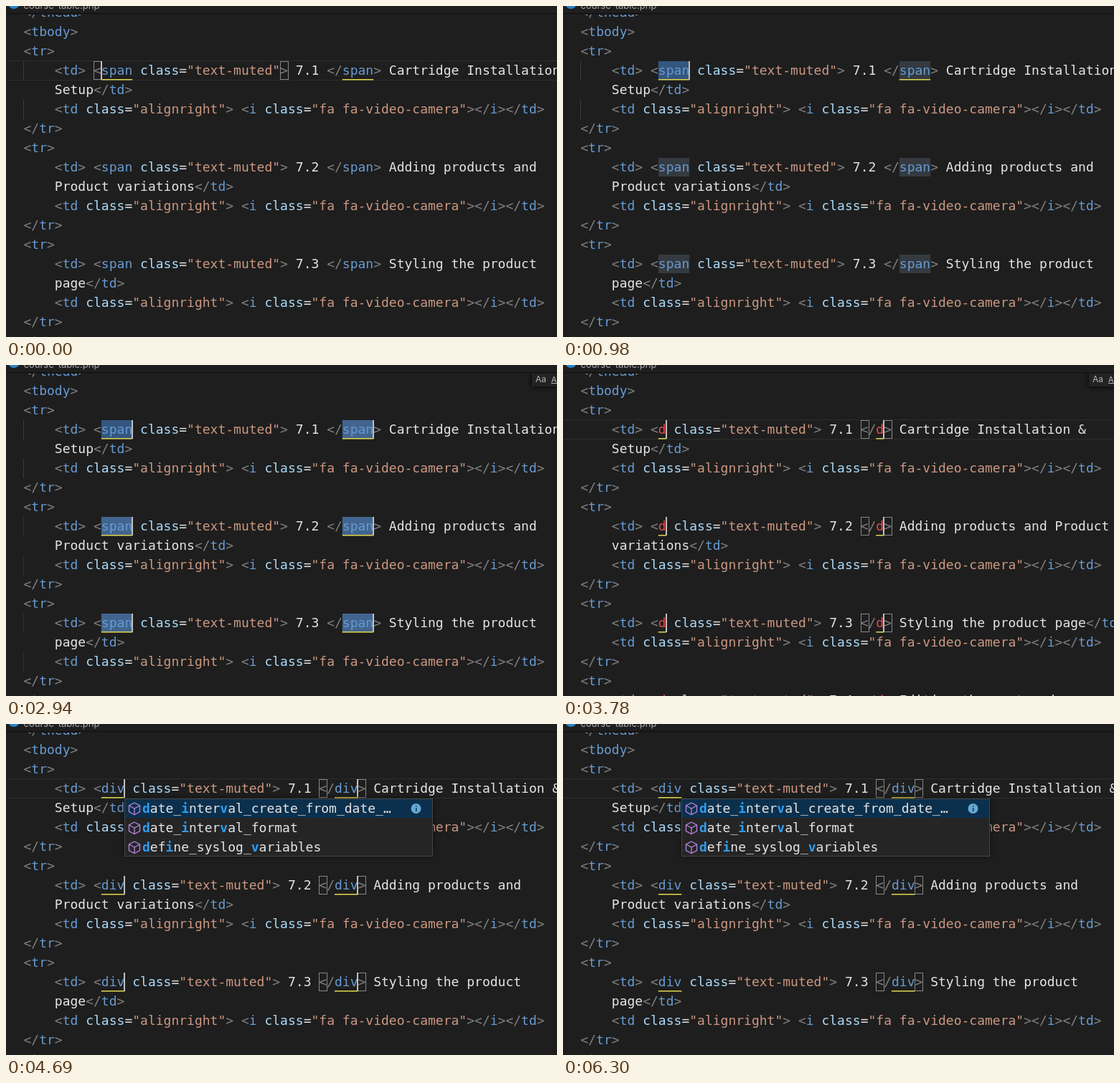
An HTML page with a canvas that plays this animation: 768 by 462 pixels, repeating every 6370 ms.

```html
<!DOCTYPE html>
<html lang="en">
<head>
<meta charset="utf-8">
<title>Multi-cursor editing</title>
<style>
html, body { margin: 0; width: 100%; height: 100%; overflow: hidden; background: #1e1e1e; }
canvas { display: block; width: 768px; height: 462px; }
</style>
</head>
<body>
<canvas id="stage" width="768" height="462"></canvas>
<script>
const ctx = document.getElementById('stage').getContext('2d');
const LOOP = 6370, LINE = 27, LEFT = 24.5, WRAP = 68;
const MONO = '18px "DejaVu Sans Mono", monospace';
const SANS = 'Inter, "Liberation Sans", sans-serif';
const color = {
  bg: '#1e1e1e', mark: '#808080', tag: '#679ad1', bad: '#e5484d', attr: '#aadafa',
  string: '#cb9781', text: '#e4e4e4', match: '#2f9cf0', line: '#e3d94f'
};
ctx.font = MONO;
const CHAR = ctx.measureText('m').width;
const INDENT = LEFT + 4 * CHAR;

const titles = [
  'Cartridge Installation & Setup',
  'Adding products and Product variations',
  'Styling the product page',
  'Editing the cart and checkout'
];
const selectTimes = [630, 1610, 2170, 2310, 2450, 2590];
const typing = [[3700, 'd'], [3990, 'di'], [4480, 'div']];
const diList = ['die', 'die', 'dir', 'dirname', 'disk_free_space', 'disk_total_space',
  'diskfreespace', 'dba_insert', 'date_interval_create_from_date_stri…',
  'date_interval_format', 'date_isodate_set', 'datefmt_is_lenient'];
const divList = ['date_interval_create_from_date_…', 'date_interval_format',
  'define_syslog_variables'];

function rect(x, y, w, h, fill) {
  ctx.fillStyle = fill;
  ctx.fillRect(x, y, w, h);
}

function outline(x, y, w, h, stroke) {
  ctx.strokeStyle = stroke;
  ctx.lineWidth = 1;
  ctx.strokeRect(Math.round(x) + .5, y + .5, Math.round(w), h);
}

function write(text, x, y, fill, font = MONO) {
  ctx.font = font;
  ctx.fillStyle = fill;
  ctx.fillText(text, x, y);
}

function disc(x, y, r, fill) {
  ctx.fillStyle = fill;
  ctx.beginPath();
  ctx.arc(x, y, r, 0, 7);
  ctx.fill();
}

function path(points, close) {
  ctx.beginPath();
  points.forEach(([x, y]) => ctx.lineTo(x, y));
  if (close) ctx.closePath();
  ctx.stroke();
}

function writeCode(line, x, y) {
  let col = 0;
  const put = (text, fill) => {
    write(text, x + col * CHAR, y, fill);
    col += text.length;
  };
  const syntax = /(<\/?)([a-z]+)|([a-z]+)(=)("[^"]*")|(>)|(\s+|[^<>\s]+)/g;
  for (const [, open, tag, attr, equals, value, end, text] of line.matchAll(syntax)) {
    if (tag) {
      put(open, color.mark);
      put(tag, /^di?$/.test(tag) ? color.bad : color.tag);
    } else if (attr) {
      put(attr, color.attr);
      put(equals, color.text);
      put(value, color.string);
    } else if (end) put(end, color.mark);
    else put(text, color.text);
  }
}

function wrapLesson(index, word) {
  const lines = [`<td> <${word} class="text-muted"> 7.${index + 1} </${word}> `];
  const parts = titles[index].split(' ');
  parts.forEach((part, i) => {
    const piece = part + (i === parts.length - 1 ? '</td>' : ' ');
    const last = lines.length - 1;
    if (lines[last].length + piece.length > WRAP) lines.push(piece);
    else lines[last] += piece;
  });
  return lines;
}

function layout(word) {
  const lines = [['</thead>', 0], ['<tbody>', 0]];
  const lessons = [];
  titles.forEach((_, i) => {
    lines.push(['<tr>', 0]);
    lessons.push(lines.length);
    wrapLesson(i, word).forEach(text => lines.push([text, 1]));
    lines.push(['<td class="alignright"> <i class="fa fa-video-camera"></i></td>', 1]);
    lines.push(['</tr>', 0]);
  });
  return { lines, lessons };
}

const rowTop = row => row * LINE - 4;
const column = n => INDENT + n * CHAR;

function drawGuides(lines, t) {
  let block = -1;
  lines.forEach(([text, indent], row) => {
    if (text === '<tr>') block++;
    if (!indent || block > 0 && t < selectTimes[1]) return;
    if (text.startsWith('<td')) rect(24, rowTop(row), 1, LINE, block ? '#303030' : '#3b3b3b');
  });
}

// Selections and highlights sit under the code; carets and outlines sit above it.
function drawSelections(lessons, selected) {
  if (!selected) return;
  lessons.slice(0, 3).forEach((row, i) => [6, 37].forEach((col, side) => {
    const order = i * 2 + side;
    const fill = order >= selected ? '#343a40' : order ? '#42658f' : '#34577f';
    rect(column(col), rowTop(row), 4 * CHAR, LINE - 1, fill);
  }));
}

function drawMarks(lessons, word, selected, typed, caretOn) {
  const n = word.length, closing = 33 + n;
  lessons.slice(0, 3).forEach((row, i) => {
    const y = rowTop(row);
    const bracket = col => outline(column(col), y, CHAR, 25, '#888888');
    const caret = col => caretOn && rect(Math.round(column(col)) - 1, y, 2, 26, '#c0c0bc');
    if (typed || i === 0 || selected > 2 * i)
      [6, closing].forEach(col => rect(column(col), y + 25, n * CHAR, 1.5, color.line));
    if (typed) {
      bracket(31 + n);
      bracket(closing + n);
      caret(6 + n);
      caret(closing + n);
    } else if (selected) {
      [6, 37].forEach((col, side) => {
        if (i * 2 + side < selected) caret(col + 4);
      });
    } else if (i === 0) {
      bracket(5);
      bracket(29);
      caret(6);
    }
  });
}

function drawCube(x, y) {
  ctx.strokeStyle = '#b180d7';
  ctx.lineWidth = 1.4;
  path([[x, y - 8], [x + 7.5, y - 4], [x + 7.5, y + 4.5], [x, y + 8.5],
    [x - 7.5, y + 4.5], [x - 7.5, y - 4]], true);
  path([[x - 7.5, y - 4], [x, y], [x + 7.5, y - 4]]);
  path([[x, y], [x, y + 8.5]]);
}

function drawKeyword(x, y) {
  ctx.strokeStyle = '#c5c5c5';
  ctx.lineWidth = 1.4;
  for (let i = 0; i < 4; i++) {
    const ly = y - 7 + i * 4.7, gap = i % 2 ? 3 : -2;
    path([[x - 9, ly], [x + gap - 2, ly]]);
    path([[x + gap + 1, ly], [x + 8, ly]]);
  }
}

function drawPopup(x, word, list) {
  const height = list.length * LINE - 1, y = 104;
  ctx.save();
  ctx.shadowColor = 'rgba(0,0,0,.5)';
  ctx.shadowBlur = 8;
  rect(x, y, 430, height, '#252526');
  ctx.restore();
  rect(x + 1, y + 1, 428, LINE - 1, '#0b304d');
  list.forEach((name, i) => {
    const mid = y + 14 + i * LINE;
    (list.length > 3 && i === 1 ? drawKeyword : drawCube)(x + 14, mid);
    let found = 0;
    [...name].forEach((char, k) => {
      const hit = char === word[found];
      if (hit) found++;
      write(char, x + 25 + k * CHAR, mid + 6, hit ? color.match : color.text,
        hit ? 'bold ' + MONO : MONO);
    });
  });
  if (list.length > 3) rect(x + 419, y + 1, 10, 87, '#4e4e4f');
  disc(x + 406.5, 118, 7, '#65a9d3');
  rect(x + 406, 114, 1.5, 1.5, '#0b304d');
  rect(x + 406, 117, 1.5, 5, '#0b304d');
  outline(x, y, 429, height, '#454545');
}

function drawFindBox() {
  ctx.save();
  ctx.shadowColor = '#000';
  ctx.shadowBlur = 6;
  rect(733, 10, 40, 20, '#232324');
  ctx.restore();
  write('Aa', 738, 24, '#b5b5b5', '12px ' + SANS);
  write('Ab', 760, 24, '#b5b5b5', '11px ' + SANS);
  rect(760, 25, 10, 1, '#b5b5b5');
}

function drawHeader() {
  rect(0, 0, 768, 10, color.bg);
  rect(0, 10, 768, 1, '#111111');
  rect(0, 11, 768, 1, '#191919');
  disc(11, -4, 8, '#2b86c9');
  write('course-table.php', 24.5, 4, '#a9a9a9', '13px ' + SANS);
}

function draw(t) {
  const typed = typing.filter(([time]) => t >= time).pop();
  const word = typed ? typed[1] : 'span';
  const selected = typed ? 0 : selectTimes.filter(time => t >= time).length;
  const lastEdit = typed ? typed[0] : selected ? selectTimes[selected - 1] : 0;
  const caretOn = Math.floor((t - lastEdit) / 500) % 2 === 0;
  const { lines, lessons } = layout(word);

  rect(0, 0, 768, 462, color.bg);
  if (!selected) {
    rect(0, 76, 768, 1, '#2d2d2d');
    rect(0, 103, 768, 1, '#2d2d2d');
  }
  if (!typed) drawGuides(lines, t);
  drawSelections(lessons, selected);
  lines.forEach(([text, indent], row) =>
    writeCode(text, indent ? INDENT : LEFT, 15 + row * LINE));
  drawMarks(lessons, word, selected, typed, caretOn);
  if (word === 'di') drawPopup(154, word, diList);
  if (word === 'div') drawPopup(165, word, divList);
  if (t >= selectTimes[1] && word !== 'div') drawFindBox();
  drawHeader();
}

const startTime = performance.now();
function tick() {
  draw((performance.now() - startTime) % LOOP);
  requestAnimationFrame(tick);
}
tick();
</script>
</body>
</html>
```
